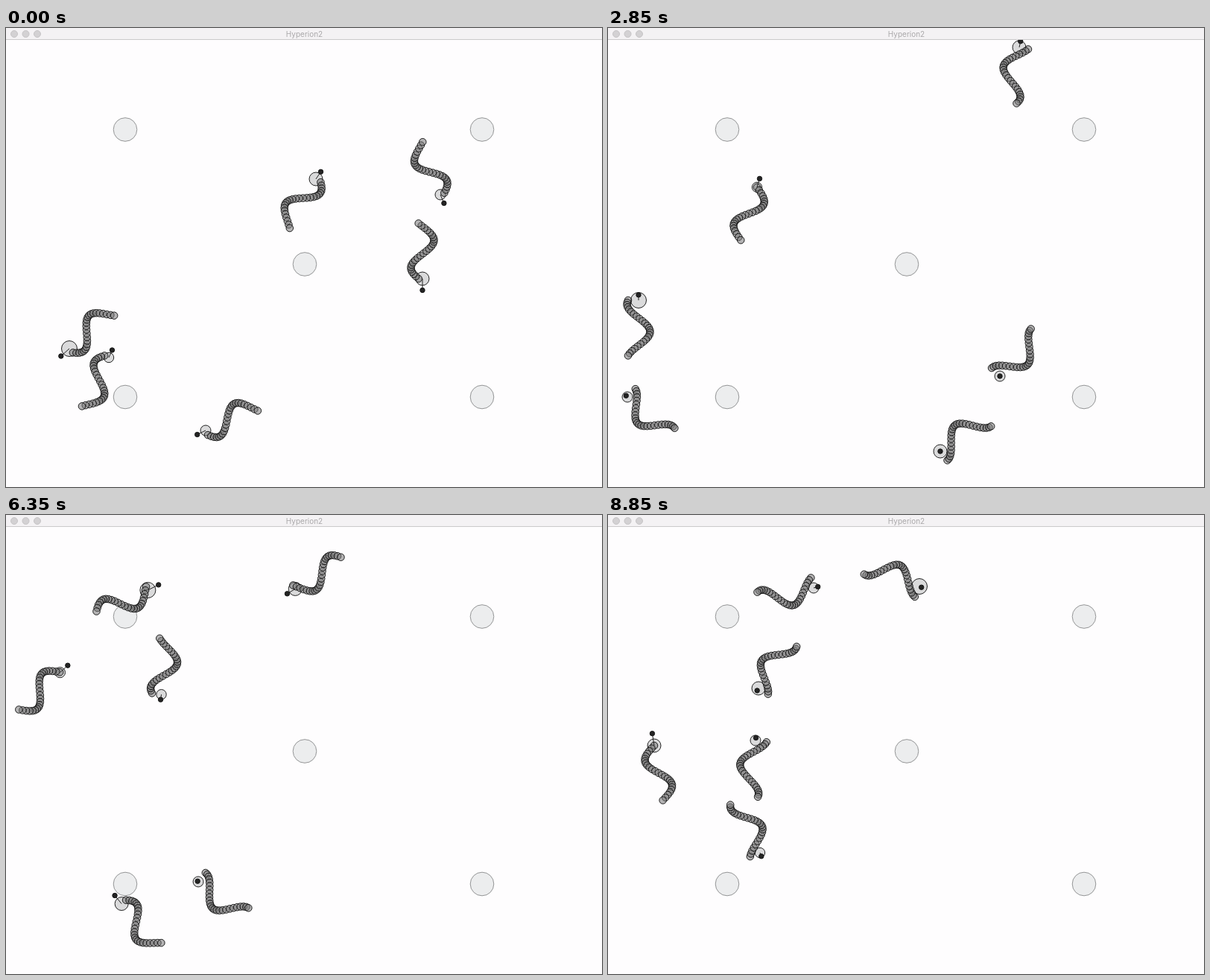
An HTML page with a canvas that plays this animation: 800x617 px, repeating every 8.9 s.

```html
<!DOCTYPE html>
<html lang="en">
<head>
<meta charset="utf-8">
<title>Hyperion2</title>
<style>
html, body { margin: 0; width: 100%; height: 100%; overflow: hidden; background: #fefdfe; }
canvas { display: block; }
</style>
</head>
<body>
<canvas id="stage" width="800" height="617"></canvas>
<script>
const ctx = document.getElementById('stage').getContext('2d');
const LOOP = 8900, STEP = 50;
const RAD = Math.PI / 180;
const PX_PER_DEG = 1 / 3.74;   // distance swum per degree of body wave
const RINGS = 25, GAP = 3.1, SWAY = 15.5;
const TIMES = [0, 1900, 2850, 4250, 5500, 7200, 8850];
const FOOD = [[160, 136.5], [639, 136.5], [401, 317.5], [160, 496], [639, 496]];

// Slopes per ms that keep a monotone run monotone.
function slopes(v) {
  const d = TIMES.slice(1).map((t, i) => (v[i + 1] - v[i]) / (t - TIMES[i]));
  return v.map((_, i) => {
    if (i === 0) return d[0];
    if (i === d.length) return d[i - 1];
    const a = d[i - 1], b = d[i];
    return a * b > 0 ? 2 * a * b / (a + b) : 0;
  });
}

function hermite(v, m, t) {
  let i = 0;
  while (i < TIMES.length - 2 && t >= TIMES[i + 1]) i++;
  const h = TIMES[i + 1] - TIMES[i];
  const u = (t - TIMES[i]) / h, u2 = u * u, u3 = u2 * u;
  return (2 * u3 - 3 * u2 + 1) * v[i] + (u3 - 2 * u2 + u) * h * m[i] +
         (3 * u2 - 2 * u3) * v[i + 1] + (u3 - u2) * h * m[i + 1];
}

// Each pose: head x, head y, heading and wave phase in degrees.
function worm(r, reach, side, poses) {
  const [x, y, dir, wave] = [0, 1, 2, 3].map(k => poses.map(p => p[k]));
  const mDir = slopes(dir), mWave = slopes(wave);
  const speed = mWave.map(m => m * PX_PER_DEG);
  const mx = speed.map((s, i) => s * Math.cos(dir[i] * RAD));
  const my = speed.map((s, i) => s * Math.sin(dir[i] * RAD));
  return t => ({
    r, reach, side,
    x: hermite(x, mx, t),
    y: hermite(y, my, t),
    dir: hermite(dir, mDir, t) * RAD,
    wave: hermite(wave, mWave, t) * RAD
  });
}

const worms = [
  worm(9, 13.5, 1, [[416, 203, -56, 30], [528, 74, -53, 643], [552, 26, -78, 848],
    [529, 10, -197, 990], [454, 58, -218, 1323], [314, 135, -203, 1890], [202, 233, -239, 2445]]),
  worm(7, 13.5, -1, [[583, 224, 67, 22], [574, 397, 112, 642], [526, 468, 135, 990],
    [420, 529, 164, 1442], [318, 524, 194, 1820], [216, 440, 244, 2310], [198, 303, 279, 2805]]),
  worm(9, 16.5, 1, [[559, 337, 90, 20], [505, 506, 127, 669], [446, 569, 142, 990],
    [324, 611, 181, 1480], [214, 575, 215, 1890], [110, 457, 243, 2493], [62, 310, 261, 3060]]),
  worm(10.5, 17, -1, [[85, 431, 138, 28], [44, 417, 258, 235], [41, 366, 270, 425],
    [64, 245, 291, 876], [125, 146, 317, 1308], [265, 76, 350, 1890], [418, 96, 384, 2440]]),
  worm(6.7, 12, -1, [[138, 443, -66, 24], [186, 283, -80, 630], [200, 214, -73, 900],
    [212, 171, -53, 1055], [213, 192, 92, 1145], [199, 309, 100, 1555], [204, 454, 69, 2095]]),
  worm(7, 14, -1, [[268, 541, 154, 26], [100, 542, 201, 630], [26, 496, 225, 1000],
    [-32, 385, 270, 1440], [19, 271, 307, 1890], [134, 162, 326, 2430], [276, 98, 345, 2995]])
];

function disc(x, y, r, fill, stroke) {
  ctx.beginPath();
  ctx.arc(x, y, r, 0, 2 * Math.PI);
  ctx.fillStyle = fill;
  ctx.fill();
  if (stroke) {
    ctx.strokeStyle = stroke;
    ctx.stroke();
  }
}

function drawWorm(w) {
  const c = Math.cos(w.dir), s = Math.sin(w.dir);
  disc(w.x, w.y, w.r, 'rgba(212,212,213,.85)', '#222');
  for (let i = 0; i < RINGS; i++) {
    const back = i * GAP;
    const off = w.side * SWAY * Math.sin(w.wave + 2 * Math.PI * i / (RINGS - 1));
    disc(w.x - c * back - s * off, w.y - s * back + c * off, 4.8,
      'rgba(120,120,120,.55)', 'rgba(0,0,0,.85)');
  }
  const len = w.reach * Math.abs(Math.cos(w.wave));
  const px = w.x + c * len, py = w.y + s * len;
  ctx.strokeStyle = '#222';
  ctx.beginPath();
  ctx.moveTo(w.x, w.y);
  ctx.lineTo(px, py);
  ctx.stroke();
  disc(px, py, 3.2, '#242424', '#161616');
}

function drawBar() {
  ctx.fillStyle = '#f4f2f4';
  ctx.fillRect(0, 0, 800, 16);
  ctx.fillStyle = '#cbc9cb';
  ctx.fillRect(0, 15, 800, 1);
  for (const x of [11, 26.5, 42]) disc(x, 8, 4.5, '#d3d1d3', '#c6c4c6');
  ctx.fillStyle = '#aaa8aa';
  ctx.font = '10px Inter, "Liberation Sans", sans-serif';
  ctx.textAlign = 'center';
  ctx.textBaseline = 'alphabetic';
  ctx.fillText('Hyperion2', 400.5, 12);
}

function draw(now) {
  const t = Math.floor((now % LOOP) / STEP) * STEP;
  ctx.fillStyle = '#fefdfe';
  ctx.fillRect(0, 0, 800, 617);
  ctx.lineWidth = 1;
  for (const [x, y] of FOOD) disc(x, y, 15.8, '#ecedee', '#949596');
  for (const w of worms) drawWorm(w(t));
  drawBar();
}

const start = performance.now();
function tick() {
  draw(performance.now() - start);
  requestAnimationFrame(tick);
}
tick();
</script>
</body>
</html>
```
